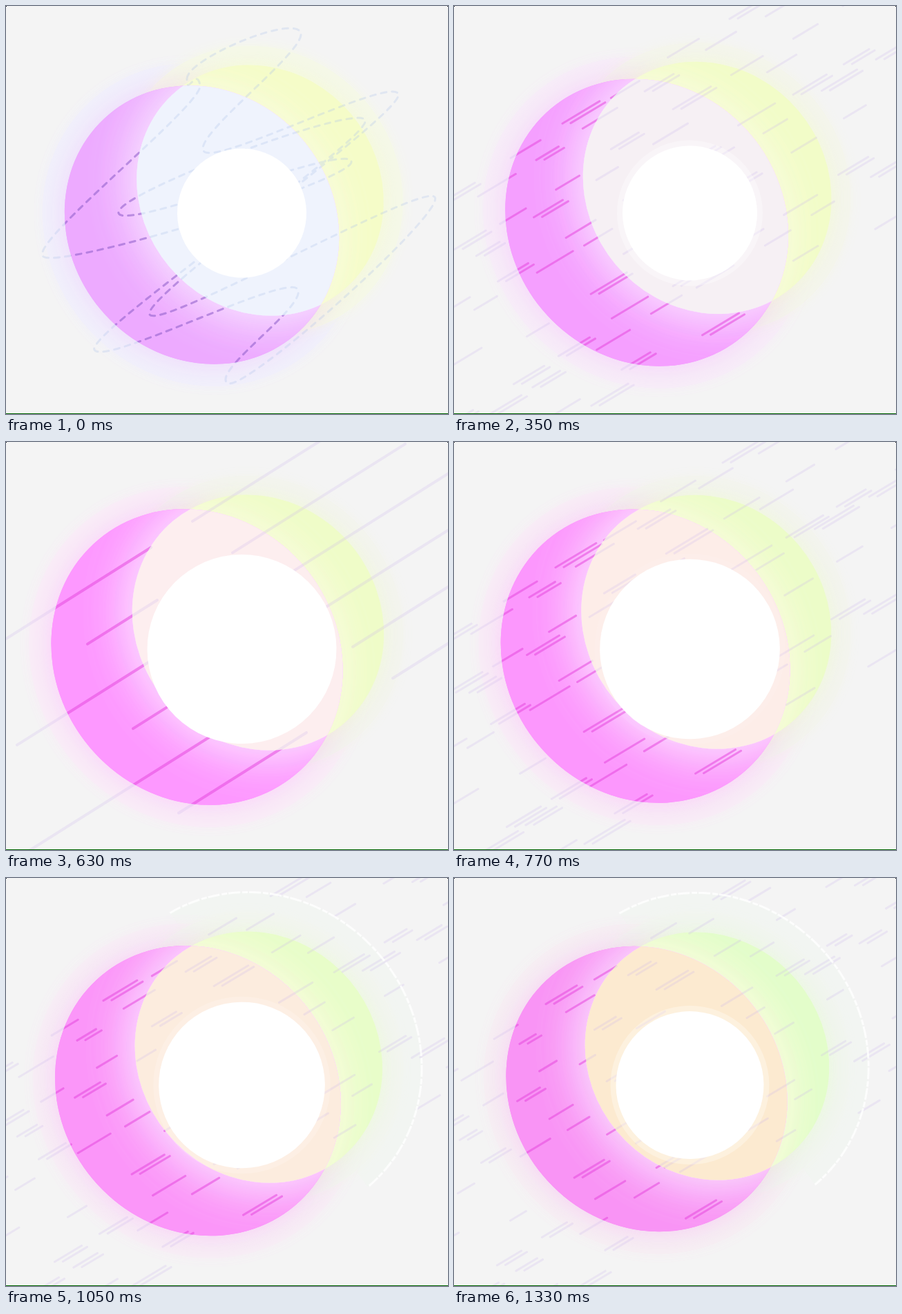
Recreate the animation shown at these times as an HTML page with a canvas. Size 640 by 591 pixels, loop 1400 ms.

```html
<!DOCTYPE html>
<html lang="en">
<head>
<meta charset="utf-8">
<title>Glowing ring</title>
<style>
  html, body { margin: 0; width: 100%; height: 100%; overflow: hidden; background: #f4f4f4; }
  canvas { display: block; width: 640px; height: 591px; }
</style>
</head>
<body>
<canvas id="stage" width="640" height="591"></canvas>
<script>
const ctx = document.getElementById('stage').getContext('2d');
const STEP = 70, STEPS = 20;
const TILT = 50 * Math.PI / 180;
const DRAWN_OUT = 8; // step at which the slanted lines are longest

// Discs are [x, y, radius]. A bend above 1 makes the hole start late and the rest start early.
const poses = [
  { n: 0, bend: 1, hole: [93.5, 0], pink: [283.5, 317, 200], lime: [368, 267, 180],
    tones: ['#edaaff', '#eff3fd', '#f5fcc8', '#f1f1fb', '#f5f8e8'] },
  { n: 3, bend: 2, hole: [90, .4], pink: [283.5, 317.5, 195.5], lime: [369.5, 266.5, 177],
    tones: ['#e6aaff', '#e9f3fc', '#f6fcc8', '#f3eefb', '#f5f8e8'] },
  { n: 8, bend: 1, hole: [137, 0], pink: [276.5, 311.5, 212.5], lime: [365, 261.5, 183.5],
    tones: ['#fd98ff', '#fdeeef', '#effcc8', '#f9eef7', '#f3f4ee'] },
  { n: 17, bend: 1, hole: [107, .3], pink: [279, 305.5, 205], lime: [366.5, 258, 178],
    tones: ['#f994f5', '#fcead0', '#e3fdca', '#f6f0f3', '#f1f5ef'] }
];

// Turning points of the winding thread, alternately left and right.
const turns = [
  [262, 105], [426, 37], [286, 210], [568, 127], [208, 447], [621, 277], [320, 546],
  [422, 410], [128, 498], [520, 165], [163, 300], [500, 225], [53, 362], [281, 115]
];

const mix = (a, b, k) => a + (b - a) * k;
const mixAll = (a, b, k) => a.map((x, i) => mix(x, b[i], k));
const noise = i => { const s = Math.sin(i * 127.1 + 3.7) * 43758.5453; return s - Math.floor(s); };
const rgb = hex => [1, 3, 5].map(i => parseInt(hex.slice(i, i + 2), 16));
const css = (c, a = 1) => `rgba(${c.map(Math.round)},${a})`;

function poseAt(n) {
  let i = poses.length - 2;
  while (poses[i].n > n) i--;
  const a = poses[i], b = poses[i + 1], k = (n - a.n) / (b.n - a.n);
  const early = k ** (1 / a.bend);
  return {
    hole: mixAll(a.hole, b.hole, k ** a.bend),
    pink: mixAll(a.pink, b.pink, early),
    lime: mixAll(a.lime, b.lime, early),
    tones: a.tones.map((hex, j) => mixAll(rgb(hex), rgb(b.tones[j]), early))
  };
}

function scoped(draw) { ctx.save(); draw(); ctx.restore(); }

// Slightly oval disc, longer along the tilt.
function oval([x, y, r], grow = 0, from = 0, to = Math.PI * 2) {
  const path = new Path2D();
  path.ellipse(x, y, r * 1.045 + grow, r * .955 + grow, TILT, from, to);
  return path;
}

function fill(path, colour, blur = 0, shadow = colour) {
  scoped(() => {
    ctx.fillStyle = colour;
    ctx.shadowColor = shadow;
    ctx.shadowBlur = blur;
    ctx.fill(path);
  });
}

// Lighten an area near the edge of another shape.
function fade(area, shape, colour, blur) {
  scoped(() => {
    ctx.clip(area);
    fill(shape, colour, blur);
    fill(shape, colour, blur);
  });
}

function threadPath(n) {
  const k = n / 3, path = new Path2D(), count = turns.length;
  const at = i => {
    const [x, y] = turns[(i + count) % count];
    return [x - k * .055 * (x - 290), y + k * .035 * (x - 420)];
  };
  const towards = ([x, y], [x2, y2]) => {
    const d = Math.hypot(x2 - x, y2 - y);
    return [(x2 - x) / d, (y2 - y) / d];
  };
  // Handle across the turn, so that each hairpin is rounded evenly.
  const handle = i => {
    const p = at(i), next = towards(p, at(i + 1)), prev = towards(p, at(i - 1));
    const [x, y] = towards(prev, next);
    return [x * 28, y * 28];
  };
  path.moveTo(...at(0));
  for (let i = 0; i < count; i++) {
    const p = at(i), q = at(i + 1), h = handle(i), g = handle(i + 1);
    path.bezierCurveTo(p[0] + h[0], p[1] + h[1], q[0] - g[0], q[1] - g[1], ...q);
  }
  return path;
}

// Six slanted lanes: long lines at one moment, scattered dashes around it.
function lanePath(n) {
  const path = new Path2D(), away = Math.abs(n - DRAWN_OUT);
  const spread = Math.min(21, 6 * away);
  for (let lane = 0; lane < 6; lane++) {
    const line = (x, x2, shift = 0) => {
      const base = 285 + 82 * lane + shift;
      path.moveTo(x, base - .63 * x);
      path.lineTo(x2, base - .63 * x2 + (away ? .03 * (x2 - x) : 0));
    };
    if (!away) {
      line(lane % 2 ? 85 + 33 * lane : 8 * lane, 210 + 9 * lane * lane);
      line(270 + 58 * lane, 460 + 118 * lane);
      continue;
    }
    for (let i = 0; i < 17; i++) {
      const seed = lane * 41 + i;
      if (lane % 2 && noise(seed + 300) < .3) continue;
      const x = i * 41 - 25 + 24 * noise(seed) - 2 * (n - DRAWN_OUT);
      const length = 16 + 24 * noise(seed + 500) + 60 / (1 + away);
      const shift = (i % 2 ? 1 : -1) * spread * (.4 + .6 * noise(seed + 900));
      line(x, x + length, shift);
      if (noise(seed + 700) > .6) line(x + 12, x + length + 8, shift + 7);
    }
  }
  return path;
}

function drawLines(n, crescent, core) {
  const winding = n < 5;
  const path = winding ? threadPath(n) : lanePath(n);
  scoped(() => {
    ctx.lineCap = 'round';
    ctx.lineWidth = n === DRAWN_OUT ? 4 : 3;
    if (winding) ctx.setLineDash([8, 8]);
    ctx.strokeStyle = winding ? 'rgba(175,195,232,.3)' : 'rgba(200,180,232,.24)';
    ctx.stroke(path);
    // The same lines are far stronger on the pink crescent.
    const outside = new Path2D(core);
    outside.rect(0, 0, 640, 591);
    ctx.clip(outside, 'evenodd');
    ctx.clip(crescent);
    ctx.strokeStyle = winding ? 'rgba(130,50,190,.4)' : 'rgba(238,40,218,.42)';
    ctx.stroke(path);
  });
}

function drawHole([r, halo]) {
  const disc = grow => oval([341.5, 300, 0], r + grow);
  fill(disc(8), `rgba(255,255,255,${halo})`);
  fill(disc(0), '#fff');
}

function draw(n) {
  const { hole, pink, lime, tones } = poseAt(n);
  const [pinkTone, coreTone, limeTone, pinkAura, limeAura] = tones;
  const pinkOval = oval(pink), limeOval = oval(lime);
  const rim = oval(lime, 57, -Math.PI * .95, 0);
  const hasRim = n > 10;

  ctx.fillStyle = '#f4f4f4';
  ctx.fillRect(0, 0, 640, 591);
  if (hasRim) fill(rim, '#f2f5f2');

  fill(oval(pink, 32), css(pinkAura), 18);
  fill(oval(lime, 28), css(limeAura), 18);
  fill(pinkOval, css(pinkTone), 40, css(pinkTone, .4));
  fill(limeOval, css(limeTone), 26, css(limeTone, .6));
  fade(limeOval, pinkOval, '#f8fbdc', 50);
  fill(pinkOval, css(pinkTone));
  fade(pinkOval, limeOval, css(mixAll(pinkTone, [250, 240, 255], .75)), 70);

  scoped(() => {
    ctx.clip(pinkOval);
    fill(limeOval, css(coreTone));
  });
  drawLines(n, pinkOval, limeOval);

  if (hasRim) scoped(() => {
    ctx.strokeStyle = 'rgba(255,255,255,.8)';
    ctx.lineWidth = 3;
    ctx.setLineDash([17, 3, 8, 2]);
    ctx.stroke(rim);
  });
  drawHole(hole);

  ctx.fillStyle = '#006400';
  ctx.fillRect(0, 590, 640, 1);
  ctx.fillStyle = '#000';
  ctx.fillRect(0, 0, 1, 1);
  ctx.fillRect(639, 0, 1, 1);
}

let shown = -1;
const start = performance.now();

function tick(now) {
  const step = Math.floor(Math.max(0, now - start) / STEP) % STEPS;
  // The motion pauses for one step in two places.
  const n = step - (step >= 8) - (step >= 12);
  if (n !== shown) draw(shown = n);
  requestAnimationFrame(tick);
}
tick(start);
</script>
</body>
</html>
```
